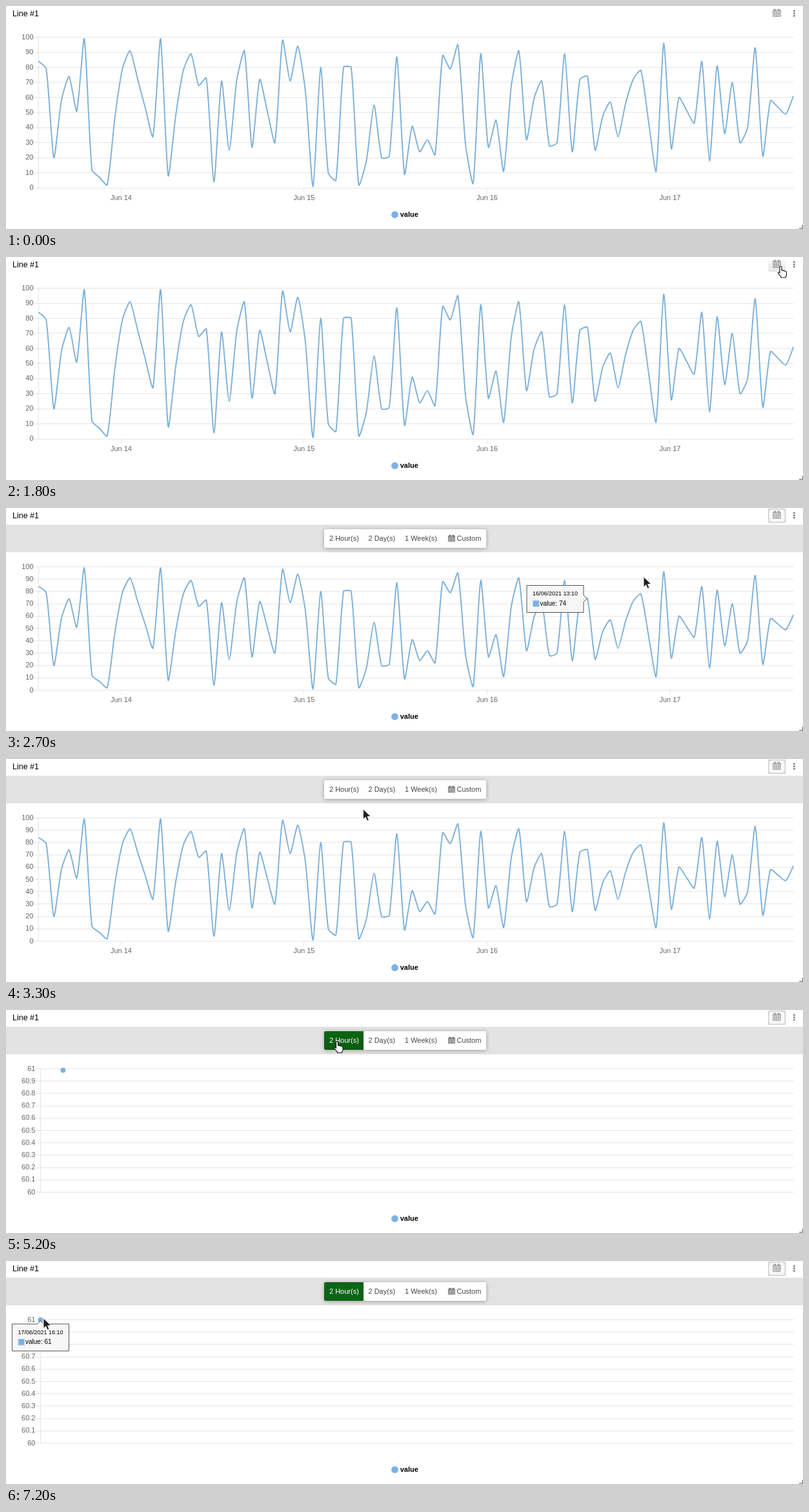
An HTML page that plays this animation: 1235x347 px, repeating every 8000 ms.

```html
<!DOCTYPE html>
<html lang="en">
<head>
<meta charset="utf-8">
<title>Line chart</title>
<style>
  html, body { margin: 0; width: 100%; height: 100%; overflow: hidden; background: #fff; }
  body { position: relative; font: 11px "Liberation Sans", Arial, sans-serif; }
  svg { display: block; }
  .layer { position: absolute; left: 0; top: 0; }
  .btn { position: absolute; box-sizing: border-box; color: #444; white-space: pre; }
  .hover { background-image: linear-gradient(transparent, rgba(0,0,0,.05) 40%, rgba(0,0,0,.1)); }
  #cal { left: 1181px; top: 1px; width: 27px; height: 22px; border-radius: 2px; }
  #cal svg { position: absolute; left: 7px; top: 3px; }
  #cal.active { box-shadow: 0 0 0 1px rgba(0,0,0,.15) inset, 0 0 6px rgba(0,0,0,.2) inset; }
  #panel { position: absolute; left: 0; top: 26px; width: 1235px; background: #e3e3e3; }
  #group { position: absolute; left: 493px; top: 7px; width: 251px; height: 29px;
    background: #fff; border-radius: 2px; box-shadow: 0 1px 6px rgba(0,0,0,.32); }
  #group .btn { top: 0; height: 29px; line-height: 29px; padding-left: 8px; }
  #hours { left: 0; width: 61px; border-radius: 2px 0 0 2px; }
  #hours.active { background-color: #0b6514; color: #fff; }
  #group svg { position: absolute; left: 8px; top: 8px; }
</style>
</head>
<body>
<svg class="layer" width="1235" height="347" viewBox="0 0 1235 347" font-family="Liberation Sans, Arial, sans-serif" font-size="11">
  <defs>
    <g id="icon">
      <path d="M.5 2.4h11.8v10h-11.8zM.5 5h11.8M.5 7.5h11.8M.5 10h11.8M3.4 5v7.4M6.4 5v7.4M9.4 5v7.4" fill="none" stroke="currentColor" stroke-width=".8"/>
      <path d="M.5 2.4h11.8v2.4h-11.8z" fill="currentColor" opacity=".3"/>
      <path d="M2.6 .3h1.8v3.2h-1.8zM8.5 .3h1.8v3.2h-1.8z" fill="currentColor"/>
    </g>
  </defs>
  <text x="10" y="16" font-size="12.5">Line #1</text>
  <path d="M1221.3 7.7v0m0 3.8v0m0 3.8v0" stroke="#808080" stroke-width="3" stroke-linecap="round"/>
  <path d="M1229 346H1234.3V340.5" fill="none" stroke="#888" stroke-width="1.5"/>
  <g id="axes"></g>
  <path id="line" fill="none" stroke="#7cb0da" stroke-width="1.9"/>
  <circle id="dot" fill="#7cb1e3"/>
  <g id="legend">
    <circle cx="602.5" cy="324.7" r="5.4" fill="#7cb1e6"/>
    <text x="610.7" y="328" font-weight="bold">value</text>
  </g>
  <g id="tip">
    <path id="tipBox" fill="#f7f7f7" fill-opacity=".92" stroke="#555" stroke-linejoin="round"/>
    <g id="tipBody">
      <text id="tipTitle" x="9" y="15.8" font-size="9"></text>
      <rect x="9.5" y="23.5" width="9.5" height="9.5" fill="#7cb1e3" stroke="#b4d3f0"/>
      <text id="tipText" x="20.5" y="31.3" font-size="10"></text>
    </g>
  </g>
</svg>
<div id="cal" class="btn"><svg width="13" height="13" color="#858585"><use href="#icon"/></svg></div>
<div id="panel">
  <div id="group">
    <div id="hours" class="btn">2 Hour(s)</div>
    <div class="btn" style="left:60.5px">2 Day(s)</div>
    <div class="btn" style="left:117px">1 Week(s)</div>
    <div class="btn" style="left:184px;padding-left:21.5px"><svg width="11" height="12" viewBox="0 0 13 13" color="#444"><use href="#icon"/></svg>Custom</div>
  </div>
</div>
<svg class="layer" width="1235" height="347" viewBox="0 0 1235 347">
  <path id="arrow" d="M0 0V16L3.7 12.6L6.2 18.4L9 17.2L6.6 11.6H11.8Z" fill="#222" stroke="#fff" stroke-width=".9"/>
  <path id="hand" d="M-3 2Q-3 .5 -1.5 .5Q0 .5 0 2V7Q1.4 6.2 2.5 7.4Q4 6.8 4.8 8.1Q7.3 7.5 7.5 10.2V13Q7.5 15 6.2 16.3V18H-1.2V16.4L-5.3 11.8Q-6.1 9.8 -4.4 9.5L-3 10.8Z" fill="#fff" stroke="#222" stroke-width="1.2" stroke-linejoin="round"/>
</svg>
<script>
const LOOP = 8000, STEP = 100, ENTER = 500, OPEN = 2200, PICK = 4300, LOAD = 4600;
const $ = id => document.getElementById(id);
const set = (el, attrs) => { for (const k in attrs) el.setAttribute(k, attrs[k]); };
const clamp = v => Math.max(0, Math.min(1, v));
const mix = (a, b, k) => a + (b - a) * k;

// Hourly readings; the gaps are filled by a rule
const values = fillGaps([
  84, 79, 20, , 74, 51, 99, 12, , 2, , , 91, , , 34, 99, 8, , ,
  89, 68, 73, 4, 71, 25, , 91, 27, 72, , 30, 98, 71, 94, 64, 1, 80, 10, 5,
  80, 80, 2, 18, 55, 20, 21, 87, 9, 41, 24, 32, 22, 88, 79, 95, 29, 3, 89, 27,
  45, 11, , 91, 32, , 71, 28, 30, 89, 24, 72, 74, 25, , 57, 34, , , 78,
  , 11, 96, 26, 60, , 43, 84, 18, 81, 36, 70, 30, 40, 93, 21, 58, , 49, 61
]);

// Rises ease out, falls run straight
function fillGaps(list) {
  let from = 0;
  for (let to = 1; to < list.length; to++) {
    if (list[to] === undefined) continue;
    const a = list[from], b = list[to];
    for (let i = from + 1; i < to; i++) {
      const k = (i - from) / (to - from);
      list[i] = mix(a, b, b > a ? Math.sin(k * Math.PI / 2) : k);
    }
    from = to;
  }
  return list;
}

// Pointer moves: begin, end, x, y
const moves = [
  [500, 700, 1193, 96], [800, 1100, 1117, 70], [1100, 1500, 1199.5, 20],
  [1700, 1800, 1202, 14], [2000, 2100, 1199.5, 11], [2200, 2700, 988, 107],
  [2700, 2900, 625, 132], [3000, 3500, 514.5, 48.5], [6100, 6200, 489, 48],
  [6300, 6500, 311, 44], [6600, 7200, 58, 89]
];

function pointer(t) {
  if (t < ENTER) return null;
  const p = { x: 763, y: 10 };
  for (const [begin, end, x, y] of moves) {
    const k = clamp((t - begin) / (end - begin)), ease = k * k * (3 - 2 * k);
    p.x = mix(p.x, x, ease);
    p.y = mix(p.y, y, ease);
  }
  return p;
}

// Tension spline whose handles scale with the neighbouring segment lengths
function curve(ys, x0, dx, tension = .2) {
  const at = i => ({ x: x0 + i * dx, y: ys[i] });
  const f = p => `${p.x.toFixed(2)} ${p.y.toFixed(2)} `;
  const handles = i => {
    const p = at(i);
    if (i === 0 || i === ys.length - 1) return [p, p];
    const a = at(i - 1), b = at(i + 1);
    const before = Math.hypot(dx, p.y - a.y), after = Math.hypot(dx, b.y - p.y);
    const shift = len => {
      const k = tension * len / (before + after);
      return { x: p.x + k * (b.x - a.x), y: p.y + k * (b.y - a.y) };
    };
    return [shift(-before), shift(after)];
  };
  let out = "M" + f(at(0));
  for (let i = 1; i < ys.length; i++)
    out += "C" + f(handles(i - 1)[1]) + f(handles(i)[0]) + f(at(i));
  return out;
}

function layout(t) {
  if (t < OPEN) return { left: 50.5, right: 1220, top: 48.55, bottom: 283.2 };
  if (t < OPEN + STEP) return { left: 53.5, right: 1216, top: 90.5, bottom: 284.5 };
  return { left: t < LOAD ? 50.5 : 53.5, right: 1220, top: 91.5, bottom: 283.5 };
}

const snap = v => Math.round(v - .5) + .5;

function drawChart({ left, right, top, bottom }, loaded) {
  const dx = (right - left) / (values.length - 1);
  let grid = `M${left} ${top}V${bottom}`, text = "";
  for (let i = 0; i <= 10; i++) {
    const y = mix(bottom, top, i / 10);
    const label = loaded ? +(60 + i / 10).toFixed(1) : i * 10;
    grid += `M${left - 8} ${snap(y)}H${right + .5}`;
    text += `<text x="${left - 8}" y="${y + 3.1}" text-anchor="end">${label}</text>`;
  }
  for (let day = 0; day < 4 && !loaded; day++) {
    const x = left + dx * (10.83 + 24 * day);
    grid += `M${snap(x)} ${bottom}v7`;
    text += `<text x="${x}" y="${bottom + 18.6}" text-anchor="middle">Jun ${14 + day}</text>`;
  }
  $("axes").innerHTML = `<path d="${grid}" fill="none" stroke="#e5e5e5"/><g fill="#666">${text}</g>`;
  const ys = values.map(v => mix(bottom, top, v / 100));
  $("line").setAttribute("d", loaded ? "" : curve(ys, left, dx));
}

function drawDot(t) {
  const rest = Math.pow(1 - clamp((t - LOAD - 16) / 1000), 4);
  set($("dot"), { cx: mix(53.5, 1220, rest), cy: mix(91.5, 166.5, rest), r: t < LOAD ? 0 : 4 * (1 - rest) });
}

function drawTip(t) {
  const late = t > LOAD;
  const alpha = late ? (t - 7000) / 200 : t < 2700 ? 0 : (2900 - t) / 200;
  const x = late ? 9.5 : 807, y = late ? 98 : 120.5;
  const sides = late ? "h39l5 -5l5 5h39v42h-88z" : "h88v15.5l5.5 5l-5.5 5v16.5h-88z";
  $("tip").setAttribute("opacity", clamp(alpha));
  $("tipBox").setAttribute("d", `M${x} ${y}${sides}`);
  $("tipBody").setAttribute("transform", `translate(${x} ${y})`);
  $("tipTitle").textContent = late ? "17/06/2021 16:10" : "16/06/2021 13:10";
  $("tipText").textContent = late ? "value: 61" : "value: 74";
}

const inside = (p, x0, y0, x1, y1) => !!p && p.x >= x0 && p.x < x1 && p.y >= y0 && p.y < y1;

function render(t) {
  const open = t >= OPEN, resizing = open && t < OPEN + STEP;
  drawChart(layout(t), t >= LOAD);
  drawDot(t);
  drawTip(t);
  $("legend").setAttribute("transform", resizing ? "translate(-.7 1)" : "translate(0 0)");

  const p = pointer(t);
  const onCal = inside(p, 1181, 1, 1208, 23), onHours = open && inside(p, 493, 33, 554, 62);
  $("cal").classList.toggle("hover", onCal);
  $("cal").classList.toggle("active", open);
  $("hours").classList.toggle("hover", onHours);
  $("hours").classList.toggle("active", t >= PICK);
  $("panel").style.display = open ? "block" : "none";
  $("panel").style.height = resizing ? "42px" : "43px";

  const hand = onCal || onHours;
  for (const id of ["arrow", "hand"]) {
    const shown = p && (id === "hand") === hand;
    $(id).style.display = shown ? "" : "none";
    if (shown) $(id).setAttribute("transform", `translate(${p.x} ${p.y})`);
  }
}

let last = -1;
const start = performance.now();
function tick() {
  const t = Math.floor((performance.now() - start) % LOOP / STEP) * STEP;
  if (t !== last) render(last = t);
  requestAnimationFrame(tick);
}
tick();
</script>
</body>
</html>
```
